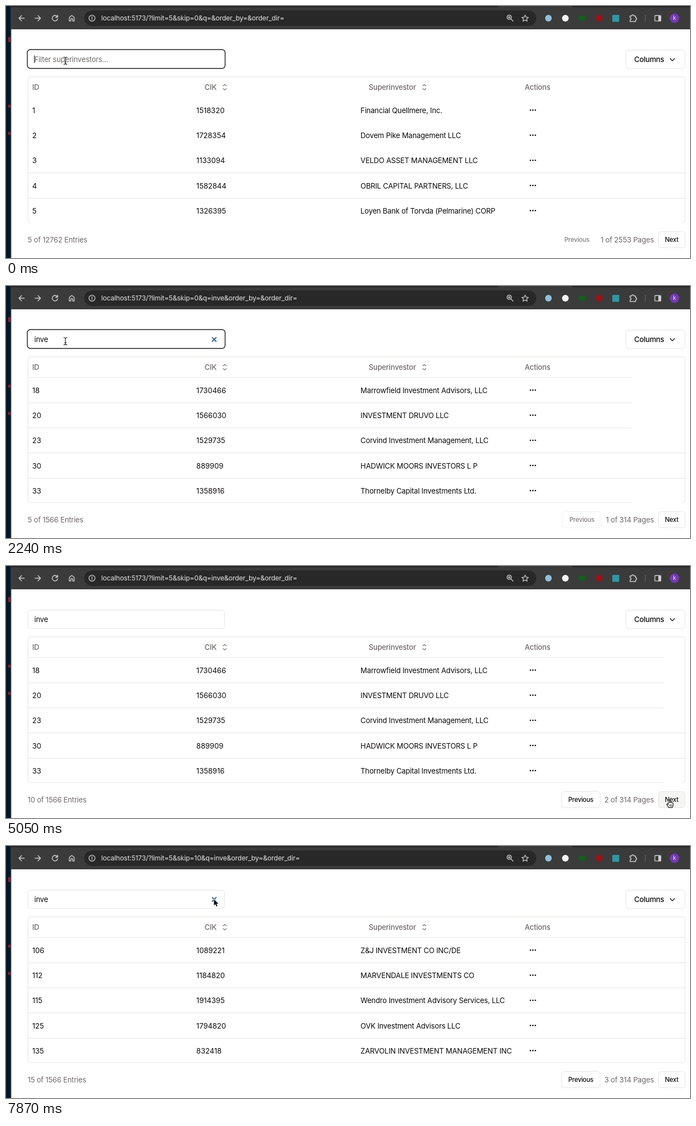
An HTML page with a canvas for the animation above (8 s loop, 1232 by 454 pixels).

```html
<!DOCTYPE html>
<html lang="en">
<head>
<meta charset="utf-8">
<title>Superinvestors table</title>
<style>
html, body { margin: 0; width: 100%; height: 100%; overflow: hidden; background: #fff; }
canvas { display: block; width: 1232px; height: 454px; }
</style>
</head>
<body>
<canvas id="stage"></canvas>
<script>
const W = 1232, H = 454, LOOP = 8000;
const canvas = document.getElementById('stage');
const ctx = canvas.getContext('2d');
const dpr = window.devicePixelRatio || 1;
canvas.width = W * dpr;
canvas.height = H * dpr;

const INK = '#0c0a09', MUTED = '#716a65', LINE = '#e5e4e3', ICON = '#d0d0d0';
const SIZE = 13.1, SMALL = 11.3;

const views = [
  { total: 12762, skip: 0, rows: [
    '1|1518320|Financial Quellmere, Inc.',
    '2|1728354|Dovem Pike Management LLC',
    '3|1133094|VELDO ASSET MANAGEMENT LLC',
    '4|1582844|OBRIL CAPITAL PARTNERS, LLC',
    '5|1326395|Loyen Bank of Torvda (Pelmarine) CORP'] },
  { total: 5417, skip: 0, rows: [
    '1|1518320|Financial Quellmere, Inc.',
    '10|847006|TREVOLD CAPITAL MANAGEMENT CO INC...',
    '11|1714450|QVZK Inc.',
    '13|1697725|Ostrell Financial Group, Inc.',
    '14|1109135|PELVORNE ASSET MANAGEMENT INC/DE'] },
  { total: 1566, skip: 0, rows: [
    '18|1730466|Marrowfield Investment Advisors, LLC',
    '20|1566030|INVESTMENT DRUVO LLC',
    '23|1529735|Corvind Investment Management, LLC',
    '30|889909|HADWICK MOORS INVESTORS L P',
    '33|1358916|Thornelby Capital Investments Ltd.'] },
  { total: 1566, skip: 5, rows: [
    '34|1633693|Jandrel Investment Management Company,...',
    '36|1635523|ZOMEL INVESTMENT RESEARCH, LLC',
    '61|1697815|ELDAMBRIC INVESTMENT MANAGEMENT,...',
    '78|1845688|XQB Investment Advisory Services, LLC',
    '105|1766328|Burlen Investment Advisory Group, Inc.'] },
  { total: 1566, skip: 10, rows: [
    '106|1089221|Z&J INVESTMENT CO INC/DE',
    '112|1184820|MARVENDALE INVESTMENTS CO',
    '115|1914395|Wendro Investment Advisory Services, LLC',
    '125|1794820|OVK Investment Advisors LLC',
    '135|832418|ZARVOLIN INVESTMENT MANAGEMENT INC'] }
];

// Each track lists [start time, value...]; a value holds until the next entry.
const tracks = {
  typed: [[0, ''], [1340, 'i'], [1490, 'in'], [1640, 'inv'], [1790, 'inve']],
  query: [[0, ''], [1490, 'i'], [1640, 'in'], [1790, 'inv'], [1940, 'inve']],
  view: [[0, 0], [1640, 1], [1940, 2], [5200, 3], [5940, 4]],
  page: [[0, 1], [5050, 2], [5800, 3]],
  lineEnd: [[0, 39], [1640, 1127], [4320, 1186], [5200, 1223]],
  caret: [[0, true], [290, false], [890, true], [2240, false], [2690, true],
    [3290, false], [3730, true], [4320, false]],
  mouse: [[0, 107, 98.5, 'beam'], [150, 107, 99.5, 'beam'], [3440, 118, 101, 'beam'],
    [3590, 260, 190, 'arrow'], [3730, 520, 300, 'arrow'], [3880, 800, 385, 'arrow'],
    [4030, 1010, 428, 'arrow'], [4170, 1130, 444, 'arrow'], [4320, 1177, 441, 'arrow'],
    [4470, 1184, 424, 'hand'], [4610, 1185, 419, 'hand'], [4760, 1191, 420, 'hand'],
    [5050, 1194, 420.5, 'hand'], [6240, 1120, 388, 'arrow'], [6390, 690, 250, 'arrow'],
    [6530, 366, 169.5, 'arrow'], [6680, 352, 140, 'arrow'], [6830, 346, 92, 'beam'],
    [6980, 354, 101, 'beam'], [7120, 374, 109, 'beam'], [7270, 388, 111, 'beam'],
    [7420, 377, 100, 'arrow'], [7570, 373.5, 95, 'arrow'], [7870, 374.5, 96, 'arrow']]
};
const BLUR = 4760, HOVER_INPUT = 6830, SPELL = 2840;

function at(name, t) {
  let hit = tracks[name][0];
  for (const entry of tracks[name]) if (entry[0] <= t) hit = entry;
  return hit.length > 2 ? hit.slice(1) : hit[1];
}

// Words are tracked slightly tight, plain numbers are not.
function text(str, x, cy, color = INK, size = SIZE, weight = 400, align = 'left') {
  ctx.font = `${weight} ${size}px Inter, "Liberation Sans", sans-serif`;
  ctx.letterSpacing = /^\d+$/.test(str) ? '0px' : '-0.19px';
  ctx.fillStyle = color;
  ctx.textAlign = align;
  ctx.fillText(str, x, cy + size * 0.364);
}

function box(x, y, w, h, r, fill, stroke, width = 1) {
  ctx.beginPath();
  ctx.roundRect(x, y, w, h, r);
  if (fill) { ctx.fillStyle = fill; ctx.fill(); }
  if (stroke) { ctx.strokeStyle = stroke; ctx.lineWidth = width; ctx.stroke(); }
}

function disc(x, y, r, fill) {
  ctx.beginPath();
  ctx.arc(x, y, r, 0, Math.PI * 2);
  ctx.fillStyle = fill;
  ctx.fill();
}

function path(d, color, width = 1.4, fill) {
  const p = new Path2D(d);
  if (fill) { ctx.fillStyle = fill; ctx.fill(p); }
  ctx.strokeStyle = color;
  ctx.lineWidth = width;
  ctx.stroke(p);
}

function rule(x1, x2, y) {
  ctx.fillStyle = LINE;
  if (x2 > x1) ctx.fillRect(x1, y, x2 - x1, 1);
}

function drawBrowser(url) {
  ctx.fillStyle = '#03192a';
  ctx.fillRect(0, 0, 9, H);
  ctx.fillStyle = '#9b1c20';
  for (const [y, h] of [[56, 9], [178, 5], [227, 5]]) ctx.fillRect(4, y, 4, h);
  ctx.fillStyle = '#4b555e';
  ctx.fillRect(8.5, 0, 1, H);

  ctx.fillStyle = '#3b3b3b';
  ctx.fillRect(9, 0, W - 9, 42);
  ctx.fillStyle = '#1f1f1f';
  ctx.fillRect(9, 0, 877, 2);
  ctx.fillRect(1020, 0, W - 1020, 2);
  box(141, 8, 814, 28, 14, '#282828');

  path('M33 22H23.5M28 17.3L23.3 22L28 26.7', ICON);
  path('M52.5 22H62M57.5 17.3L62.2 22L57.5 26.7', ICON);
  path('M92 18.8A4.9 4.9 0 1 0 93 23M93 16.5V20.2H89.3', ICON);
  path('M114 20.7L118.5 17L123 20.7V27H120.2V23H116.8V27H114Z', ICON, 1.3);
  path('M149.5 22a5.4 5.4 0 1 0 10.8 0a5.4 5.4 0 1 0 -10.8 0M154.9 21.2V24.8M154.9 18.8V20.2', ICON, 1.3);
  path('M902.5 20.3a3.9 3.9 0 1 0 7.8 0a3.9 3.9 0 1 0 -7.8 0M909.3 23.2L913.3 27.2M904.5 20.3H908.3M906.4 18.4V22.2', ICON, 1.3);
  path('M935 16.2L936.7 20.2L941 20.5L937.7 23.3L938.8 27.5L935 25.2L931.2 27.5L932.3 23.3L929 20.5L933.3 20.2Z', ICON, 1.2);
  text(url, 171.5, 21.7, '#e3e3e3', 12.35);

  disc(977, 22, 6, '#8fc1dc');
  disc(1007.5, 22, 6, '#f4f4f4');
  ctx.fillStyle = '#0b6414';
  ctx.fillRect(1032, 18, 11, 8);
  disc(1068, 22, 6, '#a50f16');
  ctx.fillStyle = '#2c98a6';
  ctx.fillRect(1092, 16, 12.5, 12.5);
  path('M1124 18H1127A2 2 0 0 1 1131 18H1134V21.2A1.9 1.9 0 0 1 1134 25V28H1124V25A1.9 1.9 0 0 0 1124 21.2Z', ICON, 1.4);
  ctx.fillStyle = '#666';
  ctx.fillRect(1151, 16, 1, 12);
  box(1168.6, 17.3, 10.8, 9.8, 1, null, ICON, 1.4);
  ctx.fillStyle = ICON;
  ctx.fillRect(1175, 17, 4.5, 10.5);
  disc(1204, 22, 8.5, '#7438b4');
  text('k', 1204, 21.8, '#efe6f8', 10, 400, 'center');
}

function drawInput(s) {
  if (s.focused) box(38.4, 78.5, 356.2, 34, 5.5, '#fff', '#1c1917', 1.4);
  else box(39.5, 79.5, 354, 33, 5, '#fff', LINE);
  text(s.typed || 'Filter superinvestors...', 51, 96.3, s.typed ? INK : MUTED);
  const width = s.typed ? ctx.measureText(s.typed).width : 0;
  if (s.focused && s.caret) {
    ctx.fillStyle = '#111';
    ctx.fillRect(50.6 + width, 89, 1, 14);
  }
  if (s.focused && s.t >= SPELL) {
    ctx.fillStyle = '#ec5a55';
    for (let x = 51; x < 50.5 + width; x += 2.6) ctx.fillRect(x, 102, 1.5, 1.4);
  }
  if (s.typed && (s.focused || s.t >= HOVER_INPUT)) {
    path('M371.6 92.9L378.4 99.7M378.4 92.9L371.6 99.7', '#2f5aa8', 2);
  }
}

function sortIcon(x) {
  path(`M${x - 2.8} 144l2.8 -2.8l2.8 2.8M${x - 2.8} 148.6l2.8 2.8l2.8 -2.8`, MUTED, 1.1);
}

function drawTable(s) {
  const top = i => 165 + i * 45.25;
  const [, my, kind] = s.mouse;
  if (kind === 'arrow') {
    const row = Math.floor((my - 165) / 45.25);
    if (row >= 0 && row < 5) {
      ctx.fillStyle = '#fafaf9';
      ctx.fillRect(40, top(row), 1183, 45);
    }
  }
  path('M44 390.5A4.5 4.5 0 0 1 39.5 386V132A4.5 4.5 0 0 1 44 127.5H1218.5A4.5 4.5 0 0 1 1223 132V386A4.5 4.5 0 0 1 1218.5 390.5', LINE, 1);
  for (const y of [164, 210, 255]) rule(40, s.lineEnd, y);
  for (const y of [300, 346]) rule(40, 1223, y);
  rule(44, Math.min(s.lineEnd, 1218), 390);

  const head = (str, x) => text(str, x, 146.6, MUTED, SIZE, 500);
  head('ID', 47.2);
  head('CIK', 357.6);
  head('Superinvestor', 653.2);
  head('Actions', 934.3);
  sortIcon(394);
  sortIcon(753.5);

  views[s.view].rows.forEach((row, i) => {
    const cy = 188 + i * 45.25;
    const [id, cik, name] = row.split('|');
    text(id, 47.2, cy);
    text(cik, 342.8, cy);
    text(name, 638.6, cy);
    for (const dx of [-4.4, 0, 4.4]) disc(949 + dx, cy - 0.4, 1.3, INK);
  });
}

function drawFooter(s) {
  const { total } = views[s.view];
  const pages = `${s.page} of ${Math.ceil(total / 5)} Pages`;
  text(`${s.page * 5} of ${total} Entries`, 39, 421.7, MUTED);
  text(pages, 1167, 421.7, MUTED, SIZE, 400, 'right');
  const x = Math.round(1167 - ctx.measureText(pages).width - 78) + 0.5;
  const first = s.page === 1;
  if (s.view) box(x, 406.5, 69.5, 29, 5, '#fff', first ? '#f1f0f0' : LINE);
  text('Previous', x + 34.8, 421.3, first ? '#85817e' : INK, SMALL, 500, 'center');
  box(1175, 406.5, 48, 29, 5, s.mouse[2] === 'hand' ? '#f5f5f4' : '#fff', LINE);
  text('Next', 1199, 421.3, INK, SMALL, 500, 'center');
}

const cursors = {
  beam() {
    const d = 'M-3 -6.5Q0 -6.5 0 -4.5Q0 -6.5 3 -6.5M0 -4.5V4.5M-3 6.5Q0 6.5 0 4.5Q0 6.5 3 6.5M-1.5 2.5H1.5';
    path(d, 'rgba(255,255,255,.8)', 2.4);
    path(d, '#111', 1.1);
  },
  arrow() {
    const d = 'M0 0V11.2L2.6 8.8L4.4 13L6.4 12.1L4.6 8.1H8.2Z';
    path(d, '#fff', 1.6);
    ctx.fillStyle = '#111';
    ctx.fill(new Path2D(d));
  },
  hand() {
    path('M-1.2 1.2Q0 -0.6 1.2 1.2V5.6Q2.6 4.6 3.6 5.8Q5 5 6 6.4Q7.4 6 7.6 7.6V10.5Q7.4 12.5 6.2 14.6H-0.4Q-2.2 11.6 -3.8 9.6Q-4.2 7.8 -2.6 8L-1.2 9.2Z', '#111', 1.1, '#fff');
    path('M1.6 9.4V12.4M3.5 9.4V12.4M5.3 9.4V12.4', '#111', 0.8);
  }
};

function draw(t) {
  const s = { t, focused: t < BLUR };
  for (const name in tracks) s[name] = at(name, t);

  ctx.setTransform(dpr, 0, 0, dpr, 0, 0);
  ctx.fillStyle = '#fff';
  ctx.fillRect(0, 0, W, H);
  ctx.lineCap = ctx.lineJoin = 'round';

  drawBrowser(`localhost:5173/?limit=5&skip=${views[s.view].skip}&q=${s.query}&order_by=&order_dir=`);
  drawInput(s);
  box(1116.5, 79.5, 106.5, 33, 5, '#fff', LINE);
  text('Columns', 1131.5, 96.3, INK, SIZE, 500);
  path('M1196.5 94.8L1200.3 98.6L1204.1 94.8', INK, 1.3);
  drawTable(s);
  drawFooter(s);

  const [x, y, kind] = s.mouse;
  ctx.save();
  ctx.translate(x, y);
  cursors[kind]();
  ctx.restore();
}

const start = performance.now();
function tick() {
  draw((performance.now() - start) % LOOP);
  requestAnimationFrame(tick);
}
tick();
</script>
</body>
</html>
```
